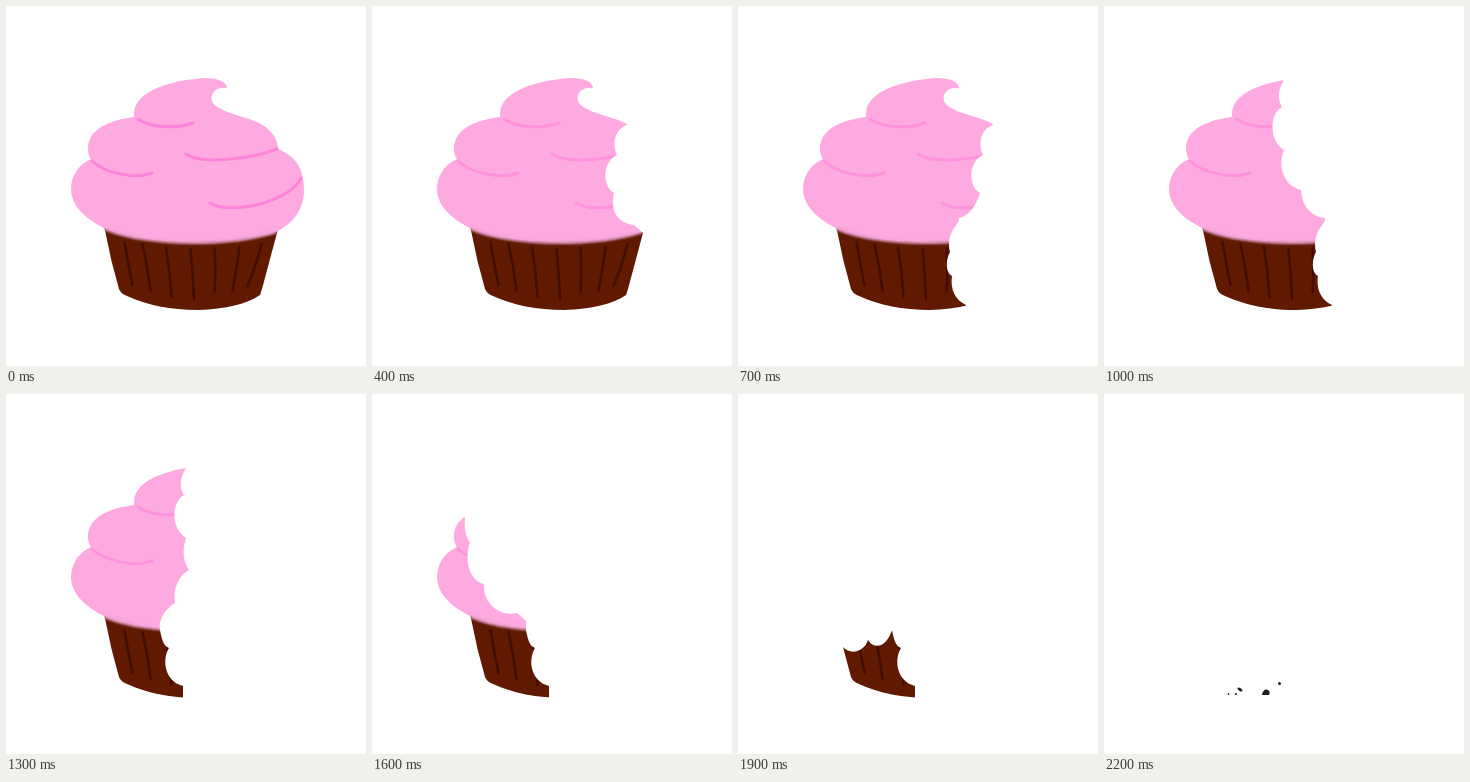
These frames come from a looping animation (360 px wide and 360 px high, 2.5 s). An HTML page:

```html
<!DOCTYPE html>
<html lang="en">
<head>
<meta charset="utf-8">
<title>Cupcake</title>
<style>
  html, body { margin: 0; width: 100%; height: 100%; overflow: hidden; background: #fff; }
  svg { display: block; width: 100%; height: 100%; }
  .line { fill: none; stroke-linecap: round; }
  #rim { filter: blur(1px); }
</style>
</head>
<body>
<svg viewBox="0 0 360 360">
  <g id="cake">
    <path fill="#611900" d="M98.5 222 L105.5 255 113 283 Q115 288 121 290 C141 299 165 304 192 304 C220 303 241 298 254 289 L256 283 271.5 225Z"/>
    <path class="line" stroke="#430d00" stroke-width="2.5" d="M118.5 236 Q122 258 126.5 279 M136.5 238 Q142 262 144.5 285 M160 241 Q164 265 165.5 291 M184.5 243 Q187 268 188 293 M208.5 242 Q210 265 208.5 286 M233.5 241 Q231 262 226.5 285 M255.5 238 Q250 260 241.5 280"/>
    <path id="frosting" fill="#ffa9e1" d="M221 81 C219 75 211 72 198 72 C168 74 128 84 128 108 L128 111 C105 114 82 122 82 143 Q82 149 85 153 C70 160 65 172 65 184 C66 202 82 214 98 222 C120 232 155 236 185 236 C220 236 250 232 270 226 C288 217 298 203 298 184 C298 168 294 152 272 143 C272 128 258 117 240 112 C228 108 212 104 207 97 C203 90 208 82 217 82 Q221 83 221 81Z"/>
    <path id="rim" class="line" stroke="#eaa0cc" stroke-width="3" d="M100 223 C121 232 155 236.5 185 236.5 C220 236.5 250 232 269 226"/>
    <path id="swirls" class="line" stroke-width="3" d="M132 113 C145 122 170 123 187 117 M180 148 C195 159 245 153 271 143 M86 155 C100 168 130 173 146 167 M204 197 C225 210 285 195 295 172"/>
  </g>
  <path id="bites" fill="#fff"/>
  <g id="crumbs" fill="#211d1d">
    <path d="M158 301 Q159 295 163 295.5 Q167 297 165 301Z"/>
    <circle cx="175.5" cy="289.5" r="1.5"/>
    <ellipse cx="136" cy="295.5" rx="2.8" ry="1.4" transform="rotate(35 136 295.5)"/>
    <circle cx="124.5" cy="300" r=".9"/>
    <circle cx="132" cy="300" r="1.1"/>
  </g>
</svg>
<script>
  const LOOP = 2500;
  const $ = id => document.getElementById(id);

  // Each bitten edge runs from top to bottom; everything right of it is gone.
  const upperRight = "M360 60 L257 118 C240 124 241 140 245 149 C230 156 230 180 242 187";
  const lowerMiddle = "C221 214 220 218 216 222 C211 230 210 238 212 246 C207 255 208 267 214 270 C212 283 217 294 228 299 V360 H360Z";
  const upperMiddle = "M360 0 H180 V74 C173 85 174 95 178 101 C165 108 165 135 180 144";
  const lowerLeft = "C156 247 158 252 163 254 C156 265 158 287 177 292 V360 H360Z";

  const stages = [
    { start: 0, bites: "", swirl: "#ff83d8" },
    { start: 400, bites: upperRight + "C238 205 245 217 262 219 L271 227 H360Z" },
    { start: 700, bites: upperRight + "C238 200 231 210 221 212" + lowerMiddle },
    { start: 1000, bites: upperMiddle + "C173 160 180 180 197 184 C198 203 210 211 221 212" + lowerMiddle },
    { start: 1300, bites: upperMiddle + "C176 155 177 168 183 176 C172 182 167 195 169 209 C158 215 152 228 154 236" + lowerLeft },
    { start: 1600, bites: "M360 0 H93 V123 C92 135 94 145 98 148 C92 165 97 187 112 190 C111 210 128 223 145 219 L154 227 154 236" + lowerLeft },
    { start: 1900, bites: "M360 0 H0 V246 H100 L104 252 C112 262 126 258 130 246 C138 258 150 250 154 236" + lowerLeft },
    { start: 2200, bites: "", crumbs: true }
  ];

  function draw(now) {
    const time = now % LOOP;
    const stage = stages.findLast(s => s.start <= time);
    $("cake").style.display = stage.crumbs ? "none" : "";
    $("crumbs").style.display = stage.crumbs ? "" : "none";
    $("swirls").setAttribute("stroke", stage.swirl || "#ff92dc");
    $("bites").setAttribute("d", stage.bites);
  }

  const began = performance.now();
  function tick() {
    draw(performance.now() - began);
    requestAnimationFrame(tick);
  }
  tick();
</script>
</body>
</html>
```
